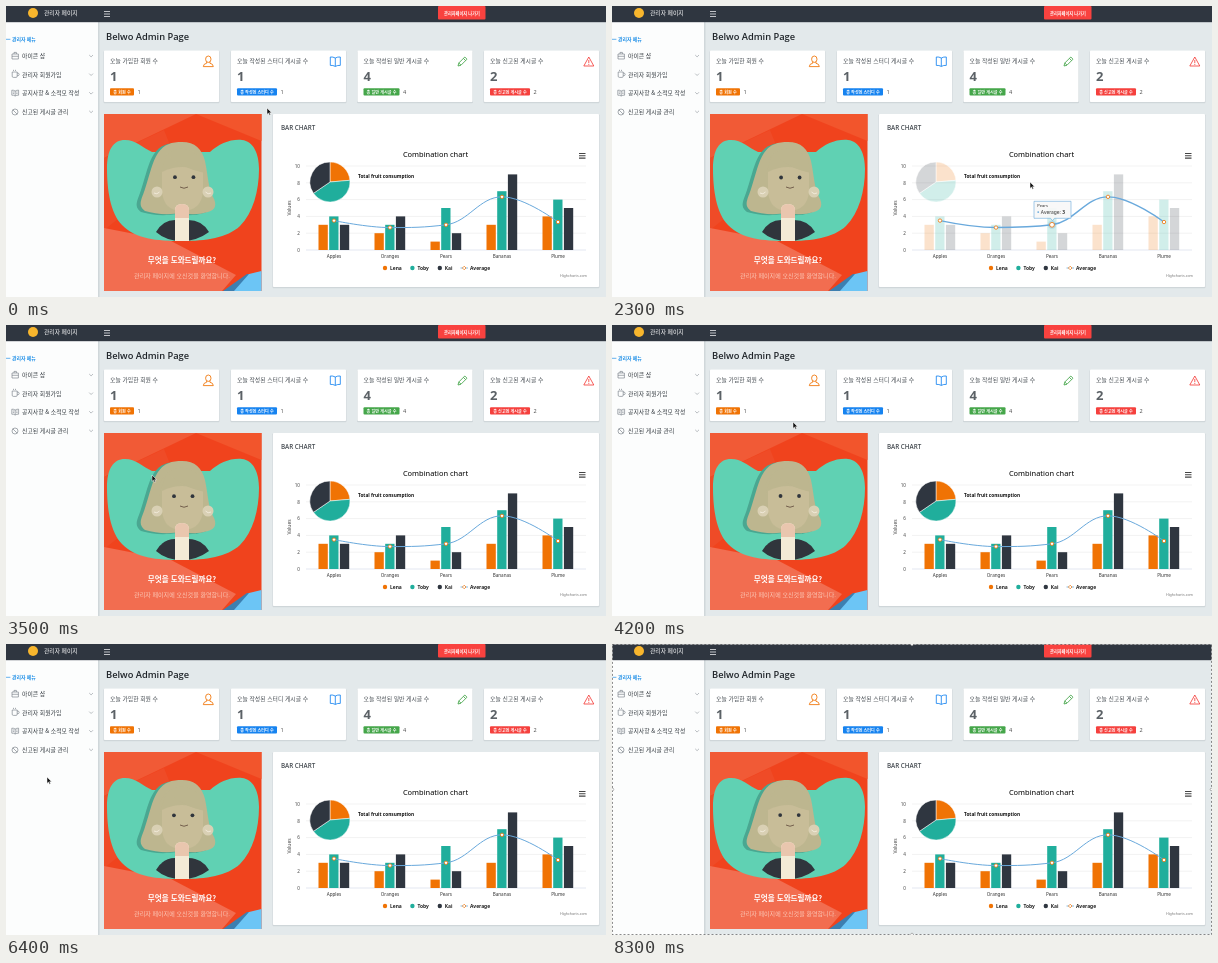
Recreate the animation shown at these times as an HTML page. Size 600 px wide and 291 px high, loop 8.4 s.

```html
<!DOCTYPE html>
<html lang="ko">
<head>
<meta charset="utf-8">
<title>Admin dashboard</title>
<style>
html, body { margin: 0; width: 100%; height: 100%; overflow: hidden; background: #e3e9eb; }
svg { display: block; width: 100vw; height: 100vh; }
.kr { font-family: "Noto Sans CJK KR", "Noto Sans CJK", sans-serif; }
.ui { font-family: "Open Sans", "Noto Sans", sans-serif; }
.ch { font-family: "Noto Sans", "Open Sans", sans-serif; }
.b { font-weight: 700; }
</style>
</head>
<body>
<svg id="stage" viewBox="0 0 600 291" preserveAspectRatio="none"></svg>
<script>
const LOOP = 8400, STEP = 100;
const ORANGE = '#f07304', TEAL = '#20ae9c', DARK = '#2f3640', BLUE = '#69a9dc';

const rect = (x, y, w, h, fill, extra = '') =>
  `<rect x="${x}" y="${y}" width="${w}" height="${h}" fill="${fill}" ${extra}/>`;
const circle = (x, y, r, fill, extra = '') =>
  `<circle cx="${x}" cy="${y}" r="${r}" fill="${fill}" ${extra}/>`;
const path = (d, fill, extra = '') => `<path d="${d}" fill="${fill}" ${extra}/>`;
const line = (d, color, w = 1, extra = '') =>
  path(d, 'none', `stroke="${color}" stroke-width="${w}" ${extra}`);
const text = (x, y, size, str, fill, cls = 'kr', extra = '') =>
  `<text x="${x}" y="${y}" font-size="${size}" fill="${fill}" class="${cls}" ${extra}>${str}</text>`;
const MID = 'text-anchor="middle"';
const card = (x, y, w, h) =>
  rect(x - .5, y + .3, w + 1, h + 1, '#cfd6d9', 'rx="1"') + rect(x, y, w, h, '#fff', 'rx=".8"');

function header() {
  return rect(0, 0, 600, 16.2, DARK) +
    circle(27, 7, 5, '#f8b62d') +
    text(38, 9.4, 5.8, '관리자 페이지', '#fff', 'kr', 'font-weight="500"') +
    line('M98 5.5h6M98 8h6M98 10.5h6', '#e6e8ea', .8) +
    rect(432, 0, 47.5, 13.5, '#f9423f', 'rx="1"') +
    text(456, 8.8, 4.2, '관리자페이지 나가기', '#fff', 'kr b', MID);
}

function sidebar() {
  const icons = [
    'M6 48h6.4v5H6zM8 48v-1.6h2.4V48M6 50.3h6.4',
    'M6.2 66h5v4.2q0 1.2-1.2 1.2H7.4q-1.2 0-1.2-1.2zM11.2 67q2 0 2 1.4t-2 1.4M7.5 65v-1.2M9.5 65v-1.2',
    'M9.2 85q-1.6-1-3.4-.8v5q1.8-.2 3.4.8 1.6-1 3.4-.8v-5q-1.8-.2-3.4.8zv5M6.8 86h1.4M10.2 86h1.4M6.8 87.6h1.4M10.2 87.6h1.4',
    'M6 106a3 3 0 1 0 6 0a3 3 0 1 0-6 0M6.9 103.9l4.2 4.2'
  ];
  const items = ['아이콘 샵', '관리자 회원가입', '공지사항 &amp; 소적모 작성', '신고된 게시글 관리'];
  return rect(0, 16, 92, 275, '#fcfdfd') + rect(92, 16, 1.5, 275, '#d0d7da') +
    line('M0 33.3h4.4', '#2492e8', .7) + text(6, 35.2, 4.9, '관리자 메뉴', '#2492e8', 'kr b') +
    items.map((s, i) => {
      const y = 50 + i * 18.6;
      return line(icons[i], '#6c747c', .6) + text(16, y + 2.2, 5.85, s, '#33393f') +
        line(`M83.2 ${y - 1}l1.9 1.9 1.9-1.9`, '#8b9299', .6);
    }).join('');
}

function stats() {
  const icons = [
    'M199.6 53.2a2.7 3.2 0 1 1 5.4 0a2.7 3.2 0 1 1-5.4 0M200.7 55.8v1.4q-3.4.7-3.4 3.4h10q0-2.7-3.4-3.4v-1.4',
    'M329.3 52q-2.4-1.3-5-1v8.4q2.6-.3 5 1 2.4-1.3 5-1v-8.4q-2.6-.3-5 1zv8.4',
    'M452 60l.8-3 6-6 2.2 2.2-6 6zM457.4 52.4l2.2 2.2M452.8 57l2.2 2.2',
    'M582.8 51l5 9h-10zM582.8 54v3.2M582.8 58.1v.9'
  ];
  const data = [
    [98, '오늘 가입한 회원 수', 1, '총 회원 수', 24, ORANGE],
    [225, '오늘 작성된 스터디 게시글 수', 1, '총 작성된 스터디 수', 40, '#1683f0'],
    [351.5, '오늘 작성된 일반 게시글 수', 4, '총 일반 게시글 수', 36, '#45a64a'],
    [478, '오늘 신고된 게시글 수', 2, '총 신고된 게시글 수', 40, '#f5403d']
  ];
  return data.map(([x, title, n, label, w, color], i) =>
    card(x, 44.5, 115, 51.5) +
    text(x + 6, 56.8, 5.85, title, '#454b51') +
    text(x + 6, 75.4, 13, n, '#5b6166', 'ui b') +
    rect(x + 6, 82.2, w, 7.4, color, 'rx="1"') +
    text(x + 6 + w / 2, 87.5, 4.1, label, '#fff', 'kr b', MID) +
    text(x + w + 9.5, 88, 5.6, n, '#444', 'ui') +
    line(icons[i], color, .85, 'stroke-linejoin="round"')
  ).join('');
}

function welcome() {
  const facets = rect(98, 108, 157.5, 177, '#f0431d') +
    path('M98 108h92l-92 44z', '#f15a36') +
    path('M98 152l60-28 16 40-76 60z', '#ef4b27') +
    path('M190 108h65.5v27z', '#f2552c') +
    path('M98 222l67 13 65 34-14 16H98z', '#f26d50') +
    path('M217 285l24-17h14v17z', '#3d7fb0') +
    path('M228 285l15-17 12.5-3v20z', '#6cc5f5');
  const blob = 'M101 163C101 144 107 134 119 134C130 134 137 142 146 146H204' +
    'C213 138 224 133 236 134C247 135 253 147 253 163C253 185 247 207 234 220' +
    'C221 232 200 235 176 235C150 235 130 233 116 219C104 207 101 182 101 163Z';
  const hair = 'M139 205C131 199 136 193 139 183C144 168 146 156 152 147C158 138 166 136 176 136' +
    'C189 136 196 143 199 155C202 169 202 181 207 191C211 198 210 204 202 206Q189 210 176 207Q155 210 139 205Z';
  const girl =
    path(hair, '#4aa791', 'transform="translate(-4 1)"') +
    path('M150 226Q157 214 169 214H182Q196 214 203 226Q191 235 176 235Q160 235 150 226Z', '#30353c') +
    path(hair, '#bdb68f') +
    path('M156 166Q176 156 197 166V186Q195 205 176 205Q158 205 156 186Z', '#c8bd98') +
    path('M153 172Q158 156 161 147Q174 162 199 167L196 154Q189 144 175 142Q158 145 153 160Z', '#bdb68f') +
    path('M169 235V204Q169 198 176 198T183 204V235Z', '#f3ead6') +
    path('M169 212V204Q169 198 176 198T183 204V212Z', '#e9c6ae') +
    circle(151, 186, 5.5, '#d9d0b4') + circle(202, 186, 5.5, '#d9d0b4') +
    line('M148 187q3 2 5.5-1M199.500 186q2.500 3 5.500 1', '#f1ead9') +
    `<g id="eyes">${circle(168.5, 171.5, 1.9, '#30353c')}${circle(187, 171.5, 1.9, '#30353c')}</g>` +
    line('M174 181q4 2.500 8 0', '#6a5545', .9);
  return facets + path(blob, '#60d1b3') + girl +
    text(176, 257, 7.55, '무엇을 도와드릴까요?', '#fff', 'kr b', MID) +
    text(176, 272.3, 6.05, '관리자 페이지에 오신것을 환영합니다.', '#fbc9b8', 'kr', MID);
}

// Chart geometry
const AVG = [3.5, 2.67, 3, 6.33, 3.33];
const FRUIT = ['Apples', 'Oranges', 'Pears', 'Bananas', 'Plume'];
const px = i => 328 + i * 56;
const py = v => 244 - v * 8.4;
// Name, colour, columns, pie share
const SERIES = [
  ['Lena', ORANGE, [3, 2, 1, 3, 4], 13],
  ['Toby', TEAL, [4, 3, 5, 7, 6], 23],
  ['Kai', DARK, [3, 4, 2, 9, 5], 19]
];

// Smooth curve that is flat at peaks and never overshoots its neighbours.
function spline() {
  const y = AVG.map(py);
  const handle = y.map((v, i) => {
    if (i === 0 || i === 4) return [0, 0];
    const a = v - y[i - 1], b = y[i + 1] - v;
    const rise = a * b <= 0 ? 0 : Math.sign(a) * Math.min(Math.abs(a + b) / 5, Math.abs(a), Math.abs(b));
    return [22.4, rise];
  });
  let d = `M${px(0)} ${y[0]}`;
  for (let i = 1; i < 5; i++) {
    const [ax, ay] = handle[i - 1], [bx, by] = handle[i];
    d += `C${px(i - 1) + ax} ${y[i - 1] + ay} ${px(i) - bx} ${y[i] - by} ${px(i)} ${y[i]}`;
  }
  return d;
}

function pie() {
  const total = SERIES.reduce((sum, s) => sum + s[3], 0);
  const at = f => `${324 + 20 * Math.sin(f * 2 * Math.PI)} ${176 - 20 * Math.cos(f * 2 * Math.PI)}`;
  let from = 0;
  return SERIES.map(([, color, , share]) => {
    const to = from + share / total;
    const d = `M324 176L${at(from)}A20 20 0 0 1 ${at(to)}Z`;
    from = to;
    return path(d, color, 'stroke="#fff" stroke-width=".5"');
  }).join('');
}

function chart() {
  let s = card(267, 108, 326, 173) +
    text(275, 123.8, 6.3, 'BAR CHART', '#454b51', 'ui', 'font-weight="600"') +
    text(429.5, 151, 7.45, 'Combination chart', '#000', 'ch', MID) +
    line('M573 147.5h6.5M573 149.8h6.5M573 152.1h6.5', '#444', 1.1);
  for (let v = 0; v <= 10; v += 2) {
    s += line(`M300 ${py(v)}H580`, v ? '#e4e4e4' : '#c5cce0', .5) +
      text(294, py(v) + 1.7, 4.6, v, '#444', 'ch', 'text-anchor="end"');
  }
  s += text(0, 0, 4.9, 'Values', '#444', 'ch', MID + ' transform="translate(285 202) rotate(-90)"');
  FRUIT.forEach((f, i) => s += text(px(i), 252, 4.6, f, '#333', 'ch', MID));
  s += '<g id="bars">' + SERIES.map(([, color, vals], k) =>
    vals.map((v, i) => rect(px(i) - 15.5 + k * 10.7, py(v), 9.3, v * 8.4, color)).join('')
  ).join('') + pie() + '</g>';
  s += text(352, 172, 4.75, 'Total fruit consumption', '#111', 'ch b');
  s += line(spline(), BLUE, 1, 'id="curve"');
  s += circle(0, 0, 4, BLUE, 'id="halo"');
  AVG.forEach((v, i) =>
    s += circle(px(i), py(v), 1.7, '#fff', `id="dot${i}" stroke="${ORANGE}" stroke-width=".8"`));
  SERIES.forEach(([name, color], i) => {
    const x = 379 + i * 27.4;
    s += circle(x, 262, 2.2, color) + text(x + 5, 263.8, 4.9, name, '#222', 'ch b');
  });
  s += line('M454.5 262h7.5', BLUE, .8) +
    path('M458.2 260.2l1.8 1.8-1.8 1.8-1.8-1.8z', '#fff', `stroke="${ORANGE}" stroke-width=".7"`) +
    text(464, 263.8, 4.9, 'Average', '#222', 'ch b') +
    text(581, 270.6, 3.65, 'Highcharts.com', '#777', 'ch', 'text-anchor="end"');
  return s + `<g id="tip">
    <path id="tipBox" fill="#f8f8f8" fill-opacity=".92" stroke="${BLUE}" stroke-width=".6"/>
    <text id="tipName" y="-17" font-size="4.1" fill="#333" class="ch"></text>
    <circle id="tipDot" cy="-11.7" r=".9" fill="${BLUE}"/>
    <text id="tipText" y="-10.2" font-size="4.9" fill="#333" class="ch">Average: <tspan id="tipValue" class="b"></tspan></text>
  </g>`;
}

function overlay() {
  const frame = 'M.3 .3H599.700V290.700H.3Z';
  const grips = [[300, .5], [300, 290.5], [.5, 145.5], [599.5, 145.5]];
  return '<g id="edge">' + line(frame, '#fff', .7) + line(frame, '#333', .7, 'stroke-dasharray="2 2"') +
    grips.map(([x, y]) => circle(x, y, 1.3, '#fff', 'stroke="#555" stroke-width=".4"')).join('') + '</g>' +
    path('M0 0V6.4L1.5 5.1 2.5 7.3 3.6 6.8 2.6 4.7H4.6Z', '#111',
      'id="cursor" stroke="#fff" stroke-width=".5"');
}

const stage = document.getElementById('stage');
stage.innerHTML = rect(0, 0, 600, 291, '#e3e9eb') + sidebar() + header() +
  text(100, 34, 9.3, 'Belwo Admin Page', '#1f2429', 'ui', 'font-weight="600"') +
  stats() + welcome() + chart() + overlay();

const $ = id => document.getElementById(id);
const set = (id, attrs) => { for (const k in attrs) $(id).setAttribute(k, attrs[k]); };
const ramp = (t, a, b) => Math.max(0, Math.min(1, (t - a) / (b - a)));
const ease = p => p * p * (3 - 2 * p);

// Time, x, y
const ROUTE = [
  [0, 261, 102], [500, 222, 122], [1100, 157, 143], [1500, 300, 205], [1900, 446, 208],
  [2300, 418, 176], [2900, 125, 209], [3500, 146, 150], [4200, 181, 97],
  [5000, 150, 118], [5700, 92, 142], [6400, 41, 133], [6900, 70, -10]
];

// Interpolates every column after the first over time.
function along(keys, t) {
  let i = 0;
  while (i < keys.length - 2 && t >= keys[i + 1][0]) i++;
  const a = keys[i], b = keys[i + 1], p = ease(ramp(t, a[0], b[0]));
  return a.slice(1).map((v, k) => v + (b[k + 1] - v) * p);
}

function draw(t) {
  const [x, y] = along(ROUTE, t);
  set('cursor', { transform: `translate(${x} ${y})` });

  const look = Math.atan2(y - 172, x - 176);
  set('eyes', { transform: `translate(${Math.cos(look) * .6} ${Math.sin(look) * .5})` });

  const hover = ramp(t, 1700, 1900) * (1 - ramp(t, 2700, 2950));
  set('bars', { opacity: 1 - .8 * hover });
  set('curve', { 'stroke-width': 1 + .4 * hover });

  const active = t < 2500 ? 2 : t < 2600 ? 1 : 0;
  const r = [20.5, 22.5, 18.5][active];
  set('tip', {
    transform: `translate(${px(active) + .5} ${py(AVG[active]) - 1})`,
    opacity: ramp(t, 1600, 1800) * (1 - ramp(t, 3200, 3500))
  });
  set('tipBox', { d: `M${-r} -22.5H${r}V-5.5H2L0 -3L-2 -5.5H${-r}Z` });
  set('tipName', { x: 3.2 - r });
  set('tipDot', { cx: 4.2 - r });
  set('tipText', { x: 6.8 - r });
  $('tipName').textContent = FRUIT[active];
  $('tipValue').textContent = AVG[active];
  set('halo', { cx: px(active), cy: py(AVG[active]), opacity: hover * .3 });
  AVG.forEach((_, i) => set('dot' + i, { r: i === active ? 1.7 + .7 * hover : 1.7 }));

  set('edge', { opacity: t >= 7000 ? 1 : 0 });
}

const start = performance.now();
function tick() {
  const t = (performance.now() - start) % LOOP;
  draw(Math.floor(t / STEP) * STEP);
  requestAnimationFrame(tick);
}
tick();
</script>
</body>
</html>
```
